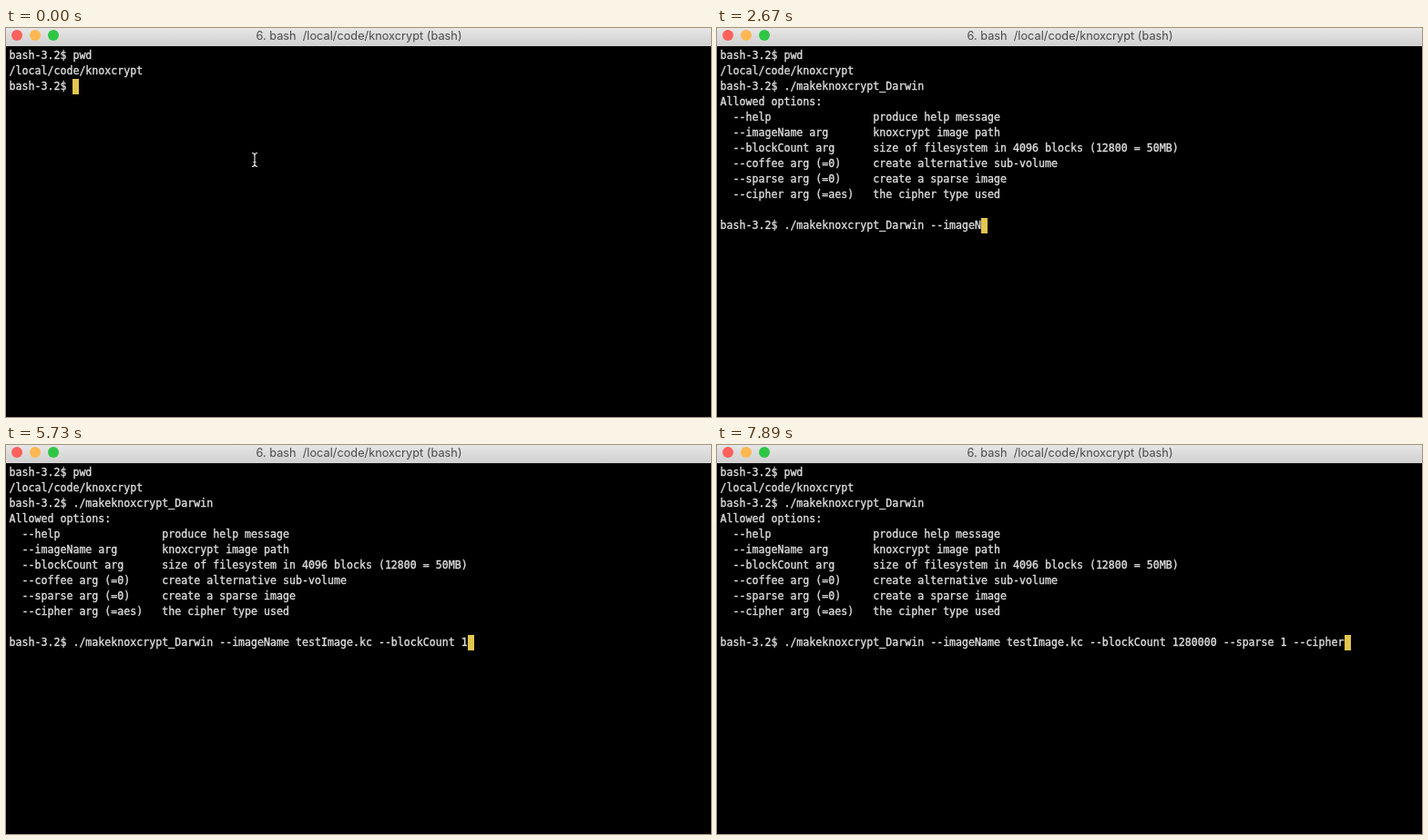
These frames come from a looping animation (774 by 428 pixels, 8 s). An HTML page:

```html
<!DOCTYPE html>
<html lang="en">
<head>
<meta charset="utf-8">
<title>Terminal</title>
<style>
  html, body { margin: 0; width: 100%; height: 100%; overflow: hidden; background: #000; }
  #stage { position: relative; width: 774px; height: 428px; overflow: hidden; background: #000; }
  #bar {
    position: absolute; inset: 0 0 auto; height: 20px; box-sizing: border-box;
    background: linear-gradient(#e6e6e6, #d0d0d0);
    font: 12.77px/18px Inter, "Open Sans", sans-serif; color: #4a4a4a;
    text-align: center; text-indent: 1px; white-space: pre;
  }
  #bar i { position: absolute; top: 2px; width: 12px; height: 12px; border-radius: 50%; }
  #text {
    position: absolute; left: 3.5px; top: 22px; margin: 0;
    font: 11.627px/17px "DejaVu Sans Mono", monospace; color: #dedede;
    -webkit-text-stroke: .35px #dedede;
  }
  #caret { position: absolute; left: 0; top: 0; width: 7px; height: 17px; background: #e2c650; }
  #mouse { position: absolute; left: 268px; top: 136px; }
</style>
</head>
<body>
<div id="stage">
  <div id="bar"><i style="left:6px;background:#fc615c"></i><i style="left:26px;background:#fdb851"></i><i style="left:46px;background:#2fc645"></i>6. bash  /local/code/knoxcrypt (bash)</div>
  <pre id="text"></pre>
  <div id="caret"></div>
  <svg id="mouse" width="10" height="18" fill="none" stroke="#e4e4e4" stroke-width="1.2">
    <path d="M2 1.5Q5 1.5 5 4.5Q5 1.5 8 1.5M5 4V14M2 16.5Q5 16.5 5 13.5Q5 16.5 8 16.5M3.5 11.5H6.5"/>
  </svg>
</div>
<script>
const LOOP = 8000, ENTER = 750, RECALL = 1110;
const PROMPT = 'bash-3.2$ ', TOOL = './makeknoxcrypt_Darwin';
const INTRO = [PROMPT + 'pwd', '/local/code/knoxcrypt'];
const OPTIONS = [
  ['--help', 'produce help message'],
  ['--imageName arg', 'knoxcrypt image path'],
  ['--blockCount arg', 'size of filesystem in 4096 blocks (12800 = 50MB)'],
  ['--coffee arg (=0)', 'create alternative sub-volume'],
  ['--sparse arg (=0)', 'create a sparse image'],
  ['--cipher arg (=aes)', 'the cipher type used']
].map(([flag, note]) => ('  ' + flag).padEnd(24) + note);

// Typing bursts: start, ms per key, keys
const FIRST = [[210, 60, './make']];
const SECOND = [
  [1290, 60, ' '],
  [1590, 60, '--imag'],
  [2250, 60, 'e'],
  [2610, 66, 'Name '],
  [3120, 60, 'test'],
  [3480, 60, 'Image.'],
  [4290, 30, 'kc'],
  [4620, 60, ' '],
  [4800, 62, '--blockCount '],
  [5730, 60, '1280000'],
  [6240, 60, ' '],
  [6450, 60, '--sparse '],
  [7110, 90, '1 '],
  [7320, 60, '-'],
  [7560, 55, '-cipher']
];

const typed = (bursts, t) => bursts.map(([start, step, keys]) =>
  t < start ? '' : keys.slice(0, Math.floor((t - start) / step) + 1)).join('');

function screen(t) {
  if (t < ENTER) {
    const command = t < 570 ? typed(FIRST, t) : TOOL + ' ';
    return [...INTRO, PROMPT + command];
  }
  const command = t < RECALL ? '' : TOOL + typed(SECOND, t);
  return [...INTRO, PROMPT + TOOL, 'Allowed options:', ...OPTIONS, '', PROMPT + command];
}

const text = document.getElementById('text');
const caret = document.getElementById('caret');
const mouse = document.getElementById('mouse');
const begin = performance.now();

function draw() {
  const t = Math.max(0, performance.now() - begin) % LOOP;
  const lines = screen(t), last = lines.length - 1;
  const content = lines.join('\n');
  if (text.textContent !== content) text.textContent = content;
  caret.style.transform = `translate(${3 + 7 * lines[last].length}px, ${22 + 17 * last}px)`;
  mouse.style.visibility = t < 210 ? 'visible' : 'hidden';
  requestAnimationFrame(draw);
}
draw();
</script>
</body>
</html>
```
